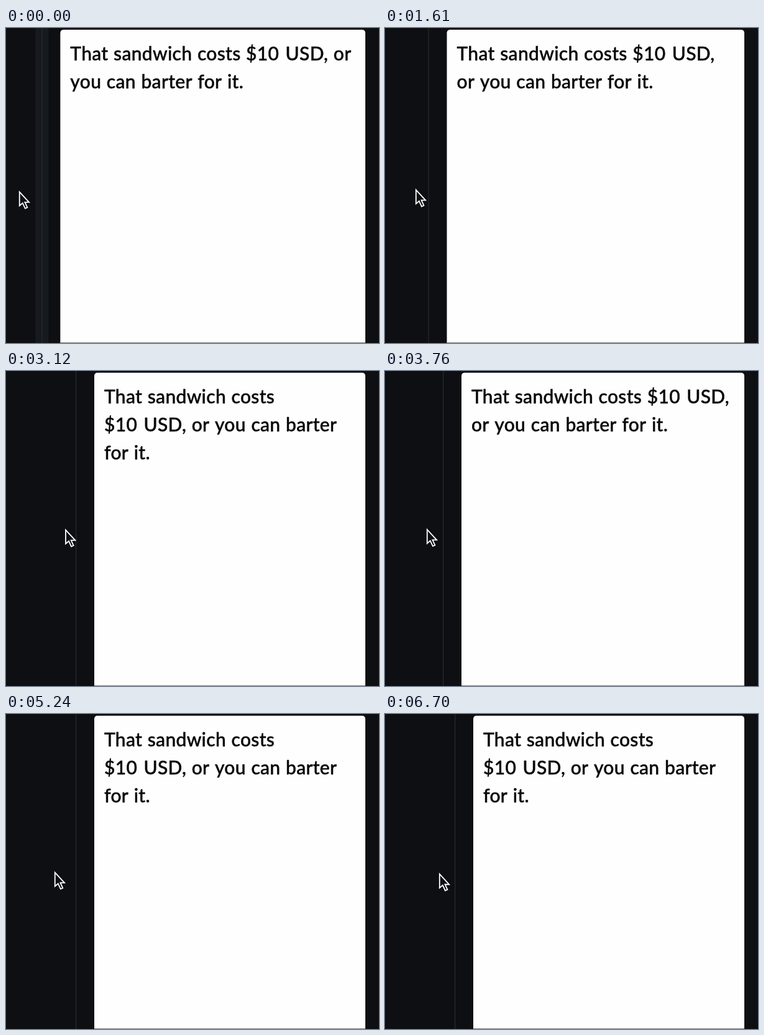
Animation of 600 by 506 pixels, one loop 7000 ms. Source, as an HTML page:

```html
<!DOCTYPE html>
<html lang="en">
<head>
<meta charset="utf-8">
<title>Resizable panel</title>
<style>
html, body { margin: 0; width: 100%; height: 100%; overflow: hidden; background: #0e0f13; }
svg { display: block; width: 100%; height: 100%; }
text {
  font: 500 30px Lato, sans-serif; letter-spacing: .3px; word-spacing: 2.5px;
  fill: #08080a; stroke: #08080a; stroke-width: .45;
}
</style>
</head>
<body>
<svg viewBox="0 0 600 506">
  <rect width="600" height="506" fill="#0e0f13"/>
  <rect id="band" width="21" height="506" fill="#171b20"/>
  <rect id="line" width="1.2" height="506" fill="#282b2f"/>
  <rect id="panel" y="2.8" height="520" rx="5" fill="#fffeff"/>
  <rect id="edge" y="505" height="1" fill="#777"/>
  <g id="words"></g>
  <path id="cursor" d="M0 0V22.2L5 17.9L9.1 26.6L12.6 25L8.7 16.6H15.3Z"
    fill="#0e0f13" stroke="#fff" stroke-width="1.8"/>
</svg>
<script>
const LOOP = 7000, RIGHT = 578, PAD = 16, SPACE = 8.6;
const LAG = 100, GRIP = 56, MAX_LEFT = 142;
const TEXT = "That sandwich costs $10\u00a0USD, or you can barter for it.";

// Pointer path: time, position
const pointerX = [
  [-200, 38], [0, 21], [200, 6.5], [600, 6.5], [680, 1], [950, 1],
  [1120, 20], [1610, 49], [2300, 88], [2750, 98], [3000, 98], [3650, 67],
  [4120, 67], [4750, 95], [5050, 95], [5240, 78], [5640, 55.5], [6080, 55.5],
  [6650, 87], [LOOP, 87]
];
const pointerY = [[0, 262], [1120, 261], [2360, 255], [4850, 253], [LOOP, 256]];

const $ = id => document.getElementById(id);
const set = (el, attrs) => { for (const k in attrs) el.setAttribute(k, attrs[k]); };
const [band, line, panel, edge, cursor] = ["band", "line", "panel", "edge", "cursor"].map($);

const words = TEXT.split(" ").map(word => {
  const el = document.createElementNS("http://www.w3.org/2000/svg", "text");
  el.textContent = word;
  $("words").append(el);
  return { el, width: el.getComputedTextLength() };
});

const slope = (a, b) => (b[1] - a[1]) / (b[0] - a[0]);

// Monotone tangent at key i
function tangent(keys, i) {
  if (i === 0 || i === keys.length - 1) return 0;
  const a = slope(keys[i - 1], keys[i]), b = slope(keys[i], keys[i + 1]);
  return a * b > 0 ? 2 * a * b / (a + b) : 0;
}

// Smooth curve through the keys
function sample(keys, t) {
  let i = 0;
  while (i < keys.length - 2 && t > keys[i + 1][0]) i++;
  const [t0, v0] = keys[i], [t1, v1] = keys[i + 1];
  const d = t1 - t0, u = (t - t0) / d;
  return v0 + (v1 - v0) * u * u * (3 - 2 * u)
    + d * u * (1 - u) * ((1 - u) * tangent(keys, i) - u * tangent(keys, i + 1));
}

function layout(left) {
  const room = RIGHT - left - 2 * PAD;
  let x = 0, row = 0;
  for (const { el, width } of words) {
    if (x + width > room) { x = 0; row++; }
    set(el, { x: left + PAD + x, y: 52 + row * 45 });
    x += width + SPACE;
  }
}

function draw(t) {
  const left = Math.min(MAX_LEFT, sample(pointerX, t - LAG) + GRIP);
  const width = RIGHT - left;
  set(panel, { x: left, width });
  set(edge, { x: left, width });
  set(line, { x: left - 30 });
  set(band, { x: left - 40, opacity: Math.max(0, 1 - t / 200) });
  set(cursor, { transform: `translate(${sample(pointerX, t) + .8} ${sample(pointerY, t) + 1.3})` });
  layout(left);
}

const start = performance.now();
function frame() {
  draw((performance.now() - start) % LOOP);
  requestAnimationFrame(frame);
}
frame();
</script>
</body>
</html>
```
